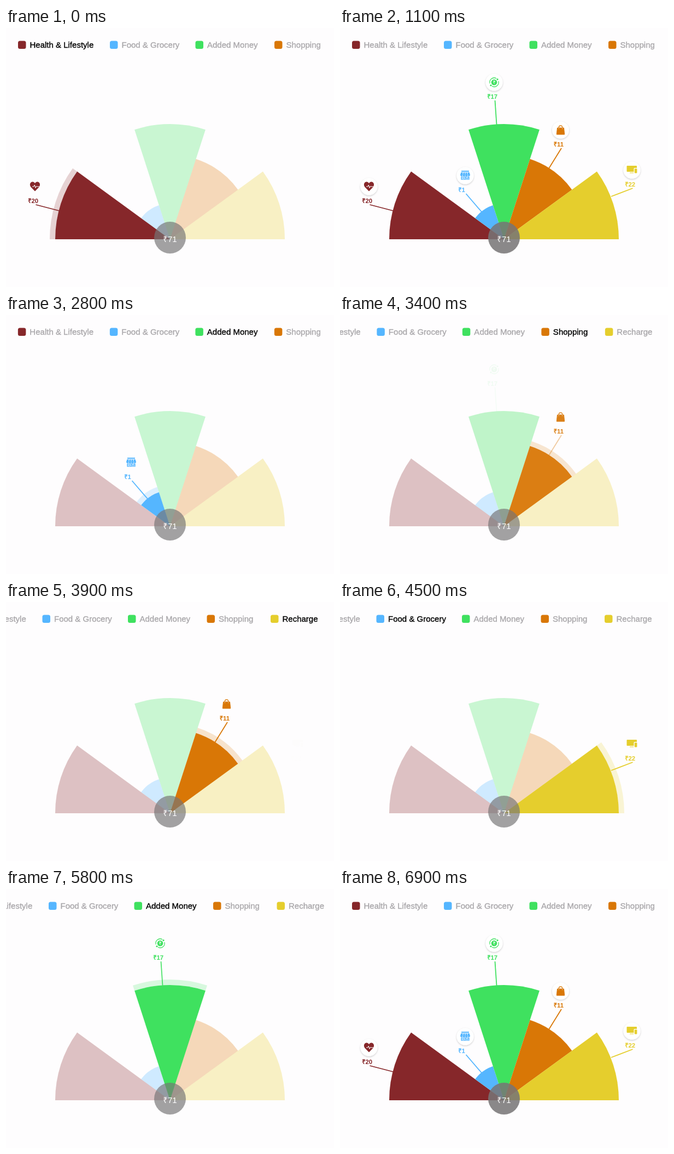
These frames come from a looping animation (600 px wide and 472 px high, 7300 ms). An HTML page:

```html
<!DOCTYPE html>
<html lang="en">
<head>
<meta charset="utf-8">
<title>Spending fan chart</title>
<style>
  html, body { margin: 0; width: 100%; height: 100%; overflow: hidden; background: #fefdfe; }
  svg { display: block; width: 600px; height: 472px; font-family: "Liberation Sans", Arial, sans-serif; }
  .legend text { font-size: 15px; stroke-width: .35px; }
  .amount { font-size: 11.4px; font-weight: 700; }
</style>
</head>
<body>
<svg id="stage" viewBox="0 0 600 472">
  <defs>
    <filter id="soft" x="-50%" y="-50%" width="200%" height="200%">
      <feDropShadow dx="0" dy="1.2" stdDeviation="1.6" flood-color="#000" flood-opacity=".22"/>
    </filter>
  </defs>
  <g id="legend" class="legend"></g>
  <g id="fan"></g>
  <g id="labels"></g>
  <circle id="hub" cx="300" cy="382" r="29" fill="#777576"/>
  <text x="300" y="390" text-anchor="middle" font-size="15" fill="#fff">₹71</text>
</svg>
<script>
const LOOP = 7300, STEP = 100, FADE = 300, CX = 300, CY = 385;
const $ = id => document.getElementById(id);

// Icons are drawn around 0,0; c is the category colour
const icons = {
  heart: c => `<path d="M0 8.6L-7.4 1C-11 -3.4 -8.4 -8.7 -4.6 -8.7C-2.4 -8.7 -.9 -7.5 0 -6C.9 -7.5 2.4 -8.7 4.6 -8.7C8.4 -8.7 11 -3.4 7.4 1Z" fill="${c}"/>
    <path d="M-5 0H-2L-.8 -3L1 2.5L2.4 -1L3.2 0H8" fill="none" stroke="#fff" stroke-width="1"/>`,
  store: c => `<path d="M-7 -9H7V-7H-7ZM-7.5 -6H7.5L9 -1.5A2.2 2.2 0 0 1 4.5 -1A2.2 2.2 0 0 1 0 -1A2.2 2.2 0 0 1 -4.5 -1A2.2 2.2 0 0 1 -9 -1.5ZM-7.6 1.6H7.6V7.6H-7.6Z" fill="${c}"/>
    <path d="M-3.6 -6L-4.4 -2M0 -6V-2M3.6 -6L4.4 -2M-5.5 3.2H-1V5.8H-5.5ZM1.8 7.6V3.2H5V7.6" fill="none" stroke="#fff" stroke-width=".9"/>`,
  coin: c => `<circle r="5.3" fill="${c}"/>
    <path d="M-7.8 2A8 8 0 0 1 4 -7M7.8 -2A8 8 0 0 1 -4 7" fill="none" stroke="${c}" stroke-width="1.3"/>
    <circle cx="6" cy="-5.5" r="1.6" fill="${c}"/><circle cx="-6" cy="5.5" r="1.6" fill="${c}"/>
    <path d="M-1.8 -2.6H1.9M-1.8 -1H1.9M-1.2 -2.6C1.8 -2.6 1.4 .4 -1.3 .4L1.2 3" fill="none" stroke="#fff" stroke-width=".8"/>`,
  bag: c => `<path d="M-6 -4H6L7.2 8H-7.2Z" fill="${c}" stroke="${c}" stroke-linejoin="round"/>
    <path d="M-3.2 -1.5V-5A3.2 3.2 0 0 1 3.2 -5V-1.5" fill="none" stroke="${c}" stroke-width="1.3"/>
    <path d="M-3.2 -4V-1.5M3.2 -4V-1.5" stroke="#fff" stroke-opacity=".6" stroke-width=".8"/>`,
  screen: c => `<path d="M-8.5 -8H8Q9 -8 9 -7V-4H5Q3.5 -4 3.5 -2.5V3H-8.5Q-9.5 3 -9.5 2V-7Q-9.5 -8 -8.5 -8ZM-4 4.4H3.2V5.6H-4Z" fill="${c}"/>
    <rect x="4.8" y="-2.8" width="4.6" height="8.4" rx="1" fill="${c}"/>`
};

// r: wedge radius, x: legend position, at: icon centre, tip: end of the leader line
const items = [
  { name: 'Health & Lifestyle', color: '#86272a', amount: 20, r: 210, x: 22, at: [53, 289], tip: [97, 333], icon: 'heart' },
  { name: 'Food & Grocery', color: '#55b6ff', amount: 1, r: 65.3, x: 190, at: [229, 269], tip: [259, 335], icon: 'store' },
  { name: 'Added Money', color: '#3fe15f', amount: 17, r: 210, x: 346.5, at: [282, 99], tip: [286.5, 176], icon: 'coin' },
  { name: 'Shopping', color: '#d97706', amount: 11, r: 153.7, x: 491, at: [403.5, 186], tip: [382, 256], icon: 'bag' },
  { name: 'Recharge', color: '#e5ce2d', amount: 22, r: 210, x: 607.5, at: [534, 259], tip: [496, 307], icon: 'screen' }
];

// Taps: time and selected category, -1 for none
const NONE = -1;
const taps = [[-1000, 0], [600, NONE], [1450, 0], [2380, 1], [2780, 2], [3180, 3], [3870, 4], [4490, 1], [5500, 2], [6190, NONE]];
const scrollFor = sel => [0, 0, 112, 123.5, 123.5][sel] || 0;

const ease = p => {
  p = Math.min(1, Math.max(0, p));
  return p < .5 ? 4 * p ** 3 : 1 - (2 - 2 * p) ** 3 / 2;
};

// Follows a value through every tap up to time t
function track(t, goal, delay = 0) {
  let v = goal(taps[0][1]);
  for (const [at, sel] of taps.slice(1)) v += (goal(sel) - v) * ease((t - at - delay) / FADE);
  return v;
}

function make(parent, tag, attrs, inner = '') {
  const el = document.createElementNS('http://www.w3.org/2000/svg', tag);
  for (const k in attrs) el.setAttribute(k, attrs[k]);
  el.innerHTML = inner;
  return parent.appendChild(el);
}

const polar = (r, deg) => {
  const a = deg * Math.PI / 180;
  return `${(CX - r * Math.cos(a)).toFixed(2)} ${(CY - r * Math.sin(a)).toFixed(2)}`;
};

const ring = (r0, r1, i) => {
  const a = i * 36, b = a + 36;
  return `M${polar(r0, a)}L${polar(r1, a)}A${r1} ${r1} 0 0 1 ${polar(r1, b)}L${polar(r0, b)}A${r0} ${r0} 0 0 0 ${polar(r0, a)}Z`;
};

const parts = items.map((it, i) => {
  const { color, x, at: [ix, iy], tip } = it;
  make($('legend'), 'rect', { x, y: 23.5, width: 14.5, height: 14.5, rx: 3.5, fill: color });
  const title = make($('legend'), 'text', { x: x + 21.5, y: 36 }, it.name.replace('&', '&amp;'));
  const halo = make($('fan'), 'path', { fill: color });
  const wedge = make($('fan'), 'path', { d: ring(0, it.r, i), fill: color });
  const label = make($('labels'), 'g', {});
  const line = make(label, 'path', { d: `M${ix + 1.5} ${iy + 33}L${tip}`, stroke: color, 'stroke-width': 1.8 });
  const disc = make(label, 'circle', { cx: ix, cy: iy, r: 15.5, fill: '#fff', filter: 'url(#soft)' });
  make(label, 'g', { transform: `translate(${ix} ${iy})` }, icons[it.icon](color));
  make(label, 'text', { x: ix - 13, y: iy + 30, fill: color, class: 'amount' }, '₹' + it.amount);
  return { title, halo, wedge, label, line, disc };
});

function draw(t) {
  const selected = taps.filter(([at]) => at <= t).pop()[1];
  const open = track(t, s => +(s === NONE));
  $('legend').setAttribute('transform', `translate(${-track(t, scrollFor)} 0)`);
  $('hub').setAttribute('opacity', .67 + .19 * open);
  parts.forEach((p, i) => {
    const picked = track(t, s => +(s === i));
    const shown = s => +(s === NONE || s === i);
    const lit = track(t, shown);
    const ink = selected === i ? '#000' : '#a9a7aa';
    p.title.setAttribute('fill', ink);
    p.title.setAttribute('stroke', ink);
    p.wedge.setAttribute('opacity', .28 + .72 * lit);
    p.halo.setAttribute('d', ring(items[i].r, items[i].r + 10 * picked, i));
    p.halo.setAttribute('opacity', .2 * picked);
    p.label.setAttribute('opacity', lit);
    p.line.setAttribute('opacity', track(t, shown, 80));
    p.disc.setAttribute('opacity', open);
  });
}

function tick() {
  const t = performance.now() % LOOP;
  draw(Math.floor(t / STEP) * STEP);
  requestAnimationFrame(tick);
}
tick();
</script>
</body>
</html>
```
